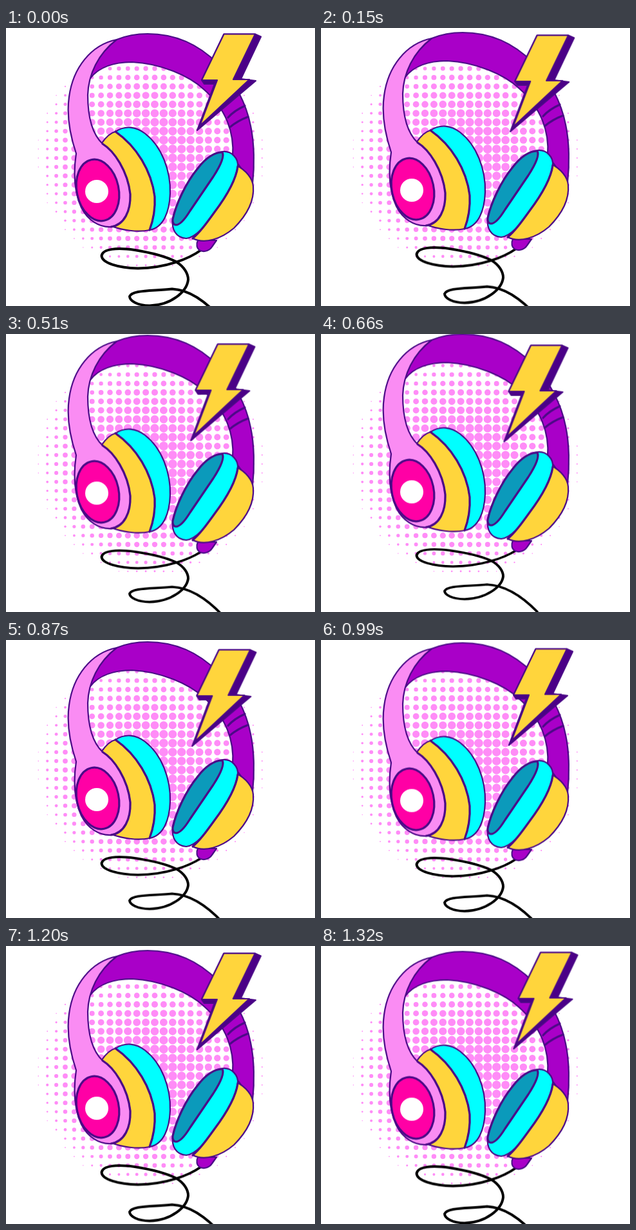
An HTML page that plays this animation: 480 px wide and 432 px high, repeating every 1350 ms.

```html
<!DOCTYPE html>
<html lang="en">
<head>
<meta charset="utf-8">
<title>Headphones</title>
<style>
  html, body { margin: 0; width: 100%; height: 100%; overflow: hidden; background: #fff; }
  svg { display: block; width: 480px; height: 432px; }
  .ink { stroke: #4b0a87; stroke-width: 2.2; stroke-linejoin: round; stroke-linecap: round; }
  .thick { stroke-width: 3.2; }
  .pink { fill: #fa8cf3; }
  .purple { fill: #a900c8; }
  .yellow { fill: #ffd53c; }
  .cyan { fill: #00ffff; }
  .teal { fill: #0b9abb; }
  .magenta { fill: #ff00a5; }
  .depth { fill: #4b0087; }
  .line { fill: none; }
  .cord { fill: none; stroke: #000; stroke-width: 4; stroke-linecap: round; }
  #phones, #cord, #bolt { animation: rise 1350ms steps(22) infinite; }
  #cord { animation-name: squeeze; transform-origin: 0 345px; }
  #bolt { animation-name: strike; }
  @keyframes rise {
    0% { transform: translate(0, 0); }
    48.889% { transform: translate(0, -8.7px); }
    97.778%, 100% { transform: translate(0, -.4px); }
  }
  @keyframes squeeze {
    0% { transform: translate(0, 0) scale(1, 1); }
    48.889% { transform: translate(0, -8.7px) scale(1, .875); }
    97.778%, 100% { transform: translate(0, -.4px) scale(1, .994); }
  }
  @keyframes strike {
    0% { transform: translate(0, 0); }
    48.889% { transform: translate(-12.5px, 8.2px); }
    97.778%, 100% { transform: translate(2.5px, .6px); }
  }
</style>
</head>
<body>
<svg viewBox="0 0 480 432">
  <g id="dots" fill="#ff8cf7"></g>

  <g id="cord">
    <path class="cord" d="M303 345C285 358 250 373 205 373.500C174 373 149 365 148.500 354C150 343 172 341 200 345C225 349 250 356 264 363C277 371 283 382 283 391C281 410 256 431 223 431.500C204 431 192 424 192 417C196 407 227 409 258 405.500C290 407 318 433 336 454"/>
  </g>

  <g id="phones">
    <!-- headband -->
    <path class="ink purple" d="M131 78C145 60 170 53 196 53C240 55 285 74 308 96C342 126 355 163 352 200L383 242C386 215 386 180 380 152C367 85 310 9 220 9C200 9 184 13 172 18C146 38 134 60 131 78Z"/>
    <path class="ink thick line" d="M345 139Q355 128 371 121M348 154Q360 144 376 138"/>

    <!-- left cup -->
    <path class="ink cyan" d="M170 161C185 151 202 153 216 164C242 184 256 222 255 257C254 285 245 310 223 314Z"/>
    <path class="ink yellow" d="M148 180C154 171 162 163 170 161C203 184 226 222 231 262C232 280 229 298 223 314C204 318 180 314 164 308Z"/>
    <path class="ink thick line" d="M170 161C203 184 226 222 231 262C232 280 229 298 223 314"/>
    <path class="ink pink" d="M172 18C132 26 104 62 98 107C93 142 102 174 109 195C104 228 107 257 117 279C127 299 145 310 163 309C184 306 194 284 193 258C189 222 168 191 150 180C131 162 127 130 127 104C128 72 143 40 172 18Z"/>
    <path class="ink thick line" d="M150 180C168 191 189 222 193 258C194 284 184 306 163 309"/>
    <ellipse class="ink thick magenta" cx="142.500" cy="252" rx="32.500" ry="48.300" transform="rotate(-12 142.500 252)"/>
    <circle cx="141" cy="254" r="18" fill="#fff"/>

    <!-- right cup -->
    <path class="ink purple" d="M298 330C295 336 296 343 302 346C309 349 317 345 320 340L327 330Z"/>
    <path class="ink yellow" d="M359 214C372 221 383 233 384 246C386 270 372 293 354 311C334 328 309 336 290 327Z"/>
    <path class="ink cyan" d="M337 192C351 191 361 203 360 215C357 238 342 262 324 286C311 304 297 325 280 327C264 326 257 313 259 297C264 274 279 241 298 218C310 202 324 193 337 192Z"/>
    <path class="ink thick line" d="M360 215C357 238 342 262 324 286C311 304 301 318 290 327"/>
    <path class="ink thick teal" d="M336 193C340 200 333 214 322 231L286 284C278 297 270 306 264 306C261 306 258 303 259 297C264 274 279 241 298 218C310 202 324 193 336 193Z"/>
  </g>

  <g id="bolt">
    <path class="ink depth" d="M338.500 9.500H387L396 13.500L365 79L388 82L297 159L324 87H308L304 81Z"/>
    <path class="ink yellow" d="M338.500 9.500H387L353 80H378L301 152L328 81H304Z"/>
  </g>
</svg>
<script>
  const pitch = 13.9, cx = 225, cy = 200, reach = 177;
  const dots = document.getElementById('dots');
  for (let row = -12; row <= 12; row++) {
    for (let col = 0; col < 26; col++) {
      const x = 50.3 + col * pitch, y = 202 + row * pitch;
      const d = Math.hypot(x - cx, y - cy);
      if (d > reach) continue;
      const dot = document.createElementNS('http://www.w3.org/2000/svg', 'circle');
      dot.setAttribute('cx', x);
      dot.setAttribute('cy', y);
      dot.setAttribute('r', 7.1 * (1 - (d / 180) ** 2) ** .75);
      dots.append(dot);
    }
  }
</script>
</body>
</html>
```
